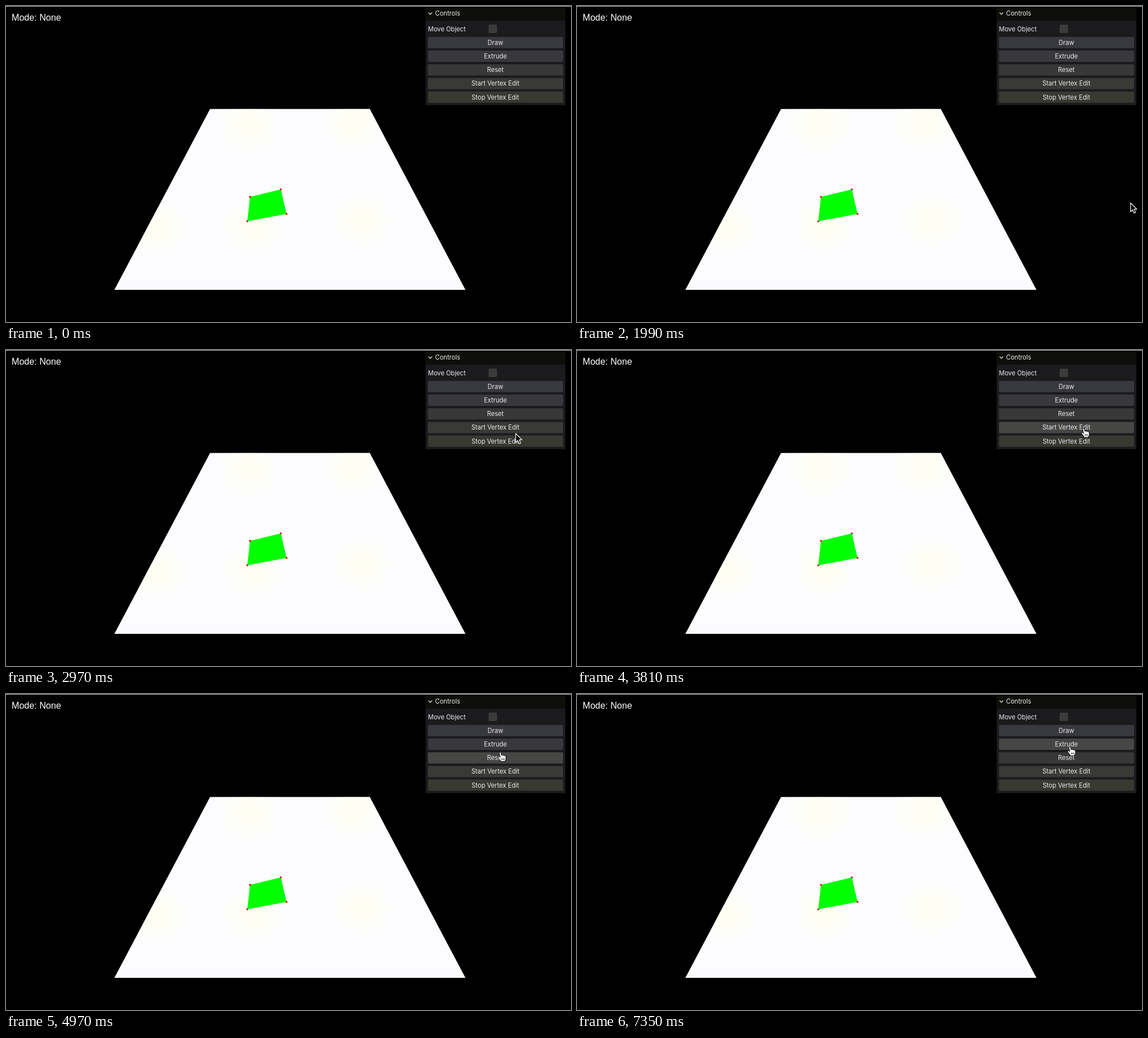
An HTML page that plays this animation: 1001x560 px, repeating every 8000 ms.

```html
<!DOCTYPE html>
<html lang="en">
<head>
<meta charset="utf-8">
<title>Extrude editor</title>
<style>
  html, body { margin: 0; width: 100%; height: 100%; overflow: hidden; background: #000; }
  svg { display: block; width: 100vw; height: 100vh; }
  .ui { font: 11.15px Inter, "Open Sans", sans-serif; fill: #ebebeb; }
  .mid { text-anchor: middle; }
</style>
</head>
<body>
<svg viewBox="0 0 1001 560" xmlns="http://www.w3.org/2000/svg">
  <defs>
    <radialGradient id="glow">
      <stop offset="0" stop-color="#fffff0"/>
      <stop offset="1" stop-color="#fffff0" stop-opacity="0"/>
    </radialGradient>
    <clipPath id="floor"><path d="M361.5 182.5H644.5L814 503H192Z"/></clipPath>
  </defs>
  <rect width="1001" height="560"/>
  <rect width="1001" height="1" fill="#c4c4c4"/>

  <g clip-path="url(#floor)">
    <rect x="190" y="180" width="630" height="326" fill="#fcfcff"/>
    <g id="glows" fill="url(#glow)"></g>
  </g>
  <path d="M432.3 338.3L487 325L497 368.5L427.5 381.5Z" fill="#0f0"/>
  <g id="dots" fill="#e00a00"></g>

  <text x="10" y="26" font-family="'Liberation Sans', Arial, sans-serif" font-size="16.1" fill="#fff">Mode: None</text>

  <rect x="743.5" y="1" width="247.5" height="174.8" fill="#1b1b1e"/>
  <rect x="743.5" y="1" width="247.5" height="25" fill="#0e0e0a"/>
  <path d="M748.6 11.6L751.8 14.8L755 11.6" fill="none" stroke="#ebebeb" stroke-width="1.3"/>
  <text class="ui" x="760.3" y="17.2" font-weight="600">Controls</text>
  <text class="ui" x="747.6" y="44.8">Move Object</text>
  <rect x="855" y="33" width="15" height="15" rx="2" fill="#3b3b3b"/>
  <g id="buttons"></g>

  <g id="cursor">
    <path id="arrow" d="M0 0V15.6L3.6 12.3L6.1 18L8.8 16.9L6.3 11.2H11Z"
      fill="#000" stroke="#fff" stroke-width="1.2" stroke-linejoin="round"/>
    <g id="hand" stroke="#000" stroke-width="1" stroke-linejoin="round">
      <path fill="#fff" d="M-1.6-.5c0-1.8 2.8-1.8 3.1 0l.9 4.2c.6-1.3 2.5-1.1 2.7.3c.8-1 2.4-.6 2.6.6c1-.7 2.3 0 2.3 1.3l.2 3c0 2-1.4 3-1.6 5.5h-7.4c-.6-2.4-2.6-4-4.6-6.6c-1.2-1.8.6-2.9 2-1.8l1.5 1.3z"/>
      <path fill="none" stroke-width=".8" d="M2.6 8.6l.3 3.4M4.8 8.6l.2 3.4M7 8.6v3.4"/>
    </g>
  </g>
</svg>
<script>
const LOOP = 8000;
const byId = id => document.getElementById(id);

function add(parent, tag, attrs, text) {
  const el = document.createElementNS("http://www.w3.org/2000/svg", tag);
  for (const k in attrs) el.setAttribute(k, attrs[k]);
  if (text) el.textContent = text;
  return parent.appendChild(el);
}

for (const [cx, cy] of [[430, 212], [615, 208], [265, 392], [438, 390], [630, 380]])
  add(byId("glows"), "ellipse", { cx, cy, rx: 62, ry: 55 });

for (const [cx, cy] of [[432.3, 338.3], [487, 325], [497, 368.5], [427.5, 381.5]])
  add(byId("dots"), "circle", { cx, cy, r: 1.7 });

const buttons = [
  ["Draw", "#38383f"], ["Extrude", "#38383e"], ["Reset", "#383839"],
  ["Start Vertex Edit", "#393935"], ["Stop Vertex Edit", "#393931"]
].map(([label, fill], i) => {
  const y = 54.8 + 24.2 * i, g = byId("buttons");
  const rect = add(g, "rect", { x: 747.5, y, width: 239.5, height: 20, rx: 2, fill });
  add(g, "text", { class: "ui mid", x: 867, y: y + 14 }, label);
  return { rect, y, fill };
});

const inOut = p => p * p * (3 - 2 * p);
const out = p => 1 - (1 - p) ** 2;
const linear = p => p;

// time, x, y, easing towards this point
const path = [
  [1910, 1004, 368, linear],
  [1990, 980.8, 349, out],
  [2030, 980, 347.5, linear],
  [2930, 903, 148, inOut],
  [3550, 903, 148, linear],
  [4250, 885, 124, inOut],
  [4370, 885, 124, linear],
  [4950, 875.5, 105, inOut],
  [5210, 875.5, 105, linear],
  [5910, 873, 95, inOut]
];

function pointerAt(t) {
  if (t < path[0][0]) return null;
  const i = path.findIndex(k => k[0] > t);
  if (i < 0) return path[path.length - 1].slice(1, 3);
  const [t0, x0, y0] = path[i - 1], [t1, x1, y1, ease] = path[i];
  const p = ease((t - t0) / (t1 - t0));
  return [x0 + (x1 - x0) * p, y0 + (y1 - y0) * p];
}

const show = (el, on) => el.setAttribute("display", on ? "inline" : "none");

function draw(t) {
  const pos = pointerAt(t);
  let over = false;
  for (const b of buttons) {
    const hit = pos && pos[0] > 747.5 && pos[0] < 987 && pos[1] >= b.y && pos[1] <= b.y + 20;
    b.rect.setAttribute("fill", hit ? "#464645" : b.fill);
    over = over || hit;
  }
  show(byId("cursor"), pos);
  if (!pos) return;
  byId("cursor").setAttribute("transform", `translate(${pos[0]} ${pos[1]})`);
  show(byId("hand"), over);
  show(byId("arrow"), !over);
}

const start = performance.now();
function tick(now) {
  draw(Math.max(0, now - start) % LOOP);
  requestAnimationFrame(tick);
}
draw(0);
requestAnimationFrame(tick);
</script>
</body>
</html>
```
